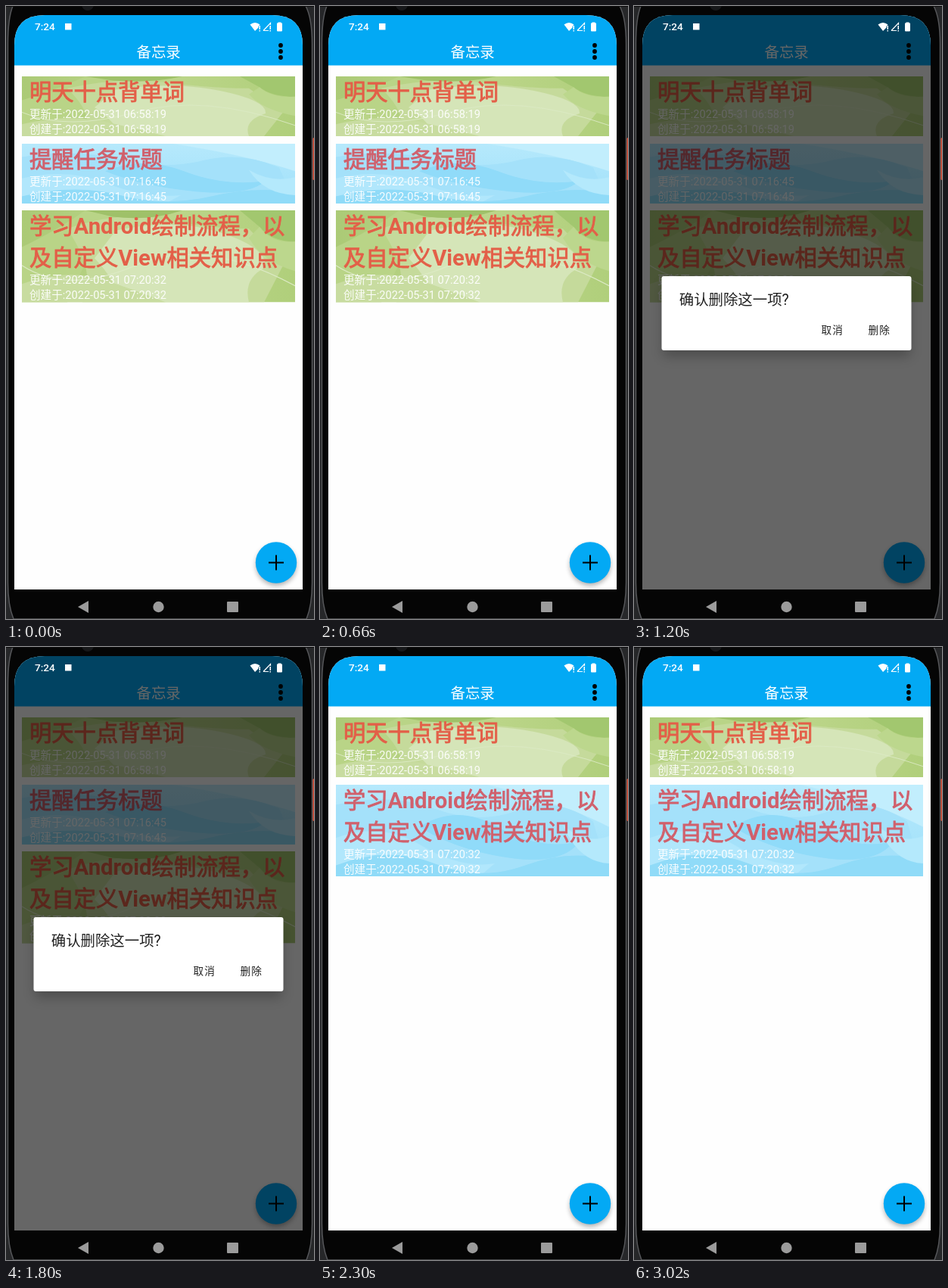
An HTML page for the animation above (3.5 s loop, 407 by 810 pixels).

```html
<!DOCTYPE html>
<html lang="zh-CN">
<head>
<meta charset="utf-8">
<title>备忘录</title>
<style>
  html, body { margin: 0; width: 100%; height: 100%; overflow: hidden; background: #000; }
  svg { display: block; }
  text { font-family: Roboto, "Noto Sans CJK SC", "Noto Sans CJK", sans-serif; }
  .head { font-size: 29.3px; }
  .head text { fill: currentColor; }
  .head .cjk { stroke: currentColor; stroke-width: .9px; }
  .head .latin { font-weight: 700; }
  .meta { font-size: 14.6px; fill: #fff; fill-opacity: .92; }
  .green { color: #e35f48; }
  .blue { color: #d0606c; }

  .before, .after, .dim, .dialog { animation: 3.5s step-end infinite; }
  .before { animation-name: before; }
  .after { animation-name: after; }
  .dim { animation-name: dim; }
  .dialog { animation-name: dialog; }
  @keyframes before { 0% { visibility: visible } 62.857%, 100% { visibility: hidden } }
  @keyframes after { 0% { visibility: hidden } 62.857%, 100% { visibility: visible } }
  @keyframes dim {
    0% { opacity: 0 } 31.4286% { opacity: .27 } 34.2857% { opacity: .6 }
    62.857% { opacity: .34 } 65.714%, 100% { opacity: 0 }
  }
  @keyframes dialog {
    0% { opacity: 0 } 31.4286% { opacity: .74 } 34.2857% { opacity: 1 }
    62.857% { opacity: .18 } 65.714%, 100% { opacity: 0 }
  }
</style>
</head>
<body>
<svg width="407" height="810" viewBox="0 0 407 810">
  <defs>
    <clipPath id="screen"><path d="M11 771V52Q11 12 51 12H352Q392 12 392 52V771Z"/></clipPath>
    <filter id="soft" x="-30%" y="-30%" width="160%" height="160%"><feGaussianBlur stdDeviation="3"/></filter>
    <filter id="wide" x="-20%" y="-40%" width="140%" height="200%"><feGaussianBlur stdDeviation="8"/></filter>
    <linearGradient id="leaf"><stop stop-color="#abca76"/><stop offset=".5" stop-color="#bdd68b"/><stop offset="1" stop-color="#b0cf7b"/></linearGradient>
    <linearGradient id="sky" x2="0" y2="1"><stop stop-color="#b6e9fc"/><stop offset="1" stop-color="#9fe0fa"/></linearGradient>
    <symbol id="greenArt" viewBox="0 0 361 100" preserveAspectRatio="none">
      <path fill="url(#leaf)" d="M0 0H361V100H0Z"/>
      <path fill="#b9d487" d="M0 40Q50 20 84 0H130Q90 40 60 100H0Z"/>
      <path fill="#c5da9b" d="M60 20Q130 0 190 10T300 20L345 60 320 100H80Q100 70 60 20Z"/>
      <path fill="#d5e5b8" d="M96 52L124 22Q200 8 262 24T322 62Q292 74 300 100H130Q124 76 96 52Z"/>
      <path fill="#c8dca0" d="M0 80Q60 62 110 76T190 100H0Z"/>
      <path fill="#9fc169" d="M84 0H212Q170 12 120 7Z"/>
      <path fill="#a2c76f" d="M288 0H361V34Q330 34 314 18Z"/>
      <path fill="#bcd78d" d="M314 18Q330 36 361 34V66Q318 56 300 30Z"/>
      <path fill="none" stroke="#dceac4" d="M0 60Q60 92 150 60T361 82"/>
    </symbol>
    <symbol id="blueArt" viewBox="0 0 361 100" preserveAspectRatio="none">
      <path fill="url(#sky)" d="M0 0H361V100H0Z"/>
      <path fill="#c2eefd" d="M200 0H361V46Q300 20 200 0Z"/>
      <path fill="#a4e1fa" d="M0 22Q70 8 130 26T240 28T340 40L361 100H0Z"/>
      <path fill="#90dbf9" d="M110 46Q160 20 214 46T322 62Q300 88 230 80T110 46Z"/>
      <path fill="#b1e7fc" d="M0 58Q60 40 112 66T210 86L190 100H0Z"/>
      <path fill="#90dbf8" d="M0 88Q70 66 130 86T250 88T361 82V100H0Z"/>
      <path fill="#b4e9fc" d="M300 44Q330 66 361 56V86Q320 84 300 44Z"/>
    </symbol>
    <g id="longHead" class="head">
      <text x="10" y="31"><tspan class="cjk">学习</tspan><tspan class="latin">Android</tspan><tspan class="cjk">绘制流程，以</tspan></text>
      <text x="10" y="73"><tspan class="cjk">及自定义</tspan><tspan class="latin">View</tspan><tspan class="cjk">相关知识点</tspan></text>
    </g>
    <g id="longMeta" class="meta">
      <text x="10" y="97">更新于:2022-05-31 07:20:32</text>
      <text x="10" y="117">创建于:2022-05-31 07:20:32</text>
    </g>
  </defs>

  <!-- phone body -->
  <rect width="407" height="810" fill="#262729"/>
  <path d="M9 0Q2.500 16 2.500 50V762Q2.500 792 10 810H397Q404.500 792 404.500 762V50Q404.500 16 396 0Z" fill="#050505" stroke="#56575a" stroke-width="1.500"/>
  <path d="M0 0H407" stroke="#0c0c0d" stroke-width="2"/>
  <circle cx="108" cy="-2" r="8" fill="#17181a"/>
  <rect x="405.500" y="174" width="4" height="56" rx="1.500" fill="#e0563f"/>

  <g clip-path="url(#screen)">
    <rect x="11" y="12" width="381" height="759" fill="#fefefe"/>
    <rect x="11" y="12" width="381" height="66.500" fill="#03a9f4"/>
    <text x="172.500" y="68" font-size="19.400" fill="#fff">备忘录</text>

    <g class="green" transform="translate(21 93)">
      <use href="#greenArt" width="361" height="79"/>
      <g class="head"><text class="cjk" x="10" y="31">明天十点背单词</text></g>
      <g class="meta">
        <text x="10" y="55">更新于:2022-05-31 06:58:19</text>
        <text x="10" y="75">创建于:2022-05-31 06:58:19</text>
      </g>
    </g>

    <g class="before">
      <g class="blue" transform="translate(21 182)">
        <use href="#blueArt" width="361" height="79"/>
        <g class="head"><text class="cjk" x="10" y="31">提醒任务标题</text></g>
        <g class="meta">
          <text x="10" y="55">更新于:2022-05-31 07:16:45</text>
          <text x="10" y="75">创建于:2022-05-31 07:16:45</text>
        </g>
      </g>
      <g class="green" transform="translate(21 270)">
        <use href="#greenArt" width="361" height="121.500"/>
        <use href="#longHead"/>
        <use href="#longMeta"/>
      </g>
    </g>
    <g class="after">
      <g class="blue" transform="translate(21 182)">
        <use href="#blueArt" width="361" height="121"/>
        <use href="#longHead"/>
        <use href="#longMeta"/>
      </g>
    </g>

    <circle cx="357" cy="739" r="27" opacity=".3" filter="url(#soft)"/>
    <circle cx="357" cy="735.500" r="27.200" fill="#03a9f4"/>
    <path d="M347 735.500H367M357 725.500V745.500" stroke="#000" stroke-width="2"/>

    <rect class="dim" x="11" y="12" width="381" height="759"/>
  </g>

  <!-- status bar and menu -->
  <g fill="#fff">
    <text x="38" y="32" font-size="13.600" font-weight="500">7:24</text>
    <rect x="78" y="23" width="8.500" height="8.500"/>
    <path d="M322.500 24.500Q329 19.500 335.500 24.500L333.500 27V28.500L329 33Z"/>
    <path d="M334.500 26H336V31H334.500ZM334.500 32H336V33.500H334.500ZM348.500 26H350V31H348.500ZM348.500 32H350V33.500H348.500Z"/>
    <path d="M340 32.500L349.500 22.500V25M340 32.500H347" fill="none" stroke="#fff" stroke-width="1.200"/>
    <path d="M359.500 22.500V21.500H363.500V22.500H364.500Q365 22.500 365 23V32.500Q365 33.500 364 33.500H359Q358 33.500 358 32.500V23Q358 22.500 358.500 22.500Z"/>
  </g>
  <circle cx="363" cy="52" r="2.900"/>
  <circle cx="363" cy="60" r="2.900"/>
  <circle cx="363" cy="68" r="2.900"/>

  <g class="dialog">
    <rect x="38" y="367" width="327" height="96" rx="4" opacity=".25" filter="url(#wide)"/>
    <rect x="36.500" y="357" width="330" height="98" rx="3" fill="#fff"/>
    <g fill="#212121">
      <text x="59.800" y="395" font-size="19.400">确认删除这一项?</text>
      <g font-size="13.600" letter-spacing="1.200">
        <text x="247.500" y="433">取消</text>
        <text x="309.500" y="433">删除</text>
      </g>
    </g>
  </g>

  <!-- navigation bar -->
  <g fill="#9b9b9b">
    <path d="M95 794L109 786V802Z"/>
    <circle cx="201.500" cy="794" r="7.200"/>
    <rect x="292" y="787" width="15" height="14" rx="1"/>
  </g>
</svg>
</body>
</html>
```
